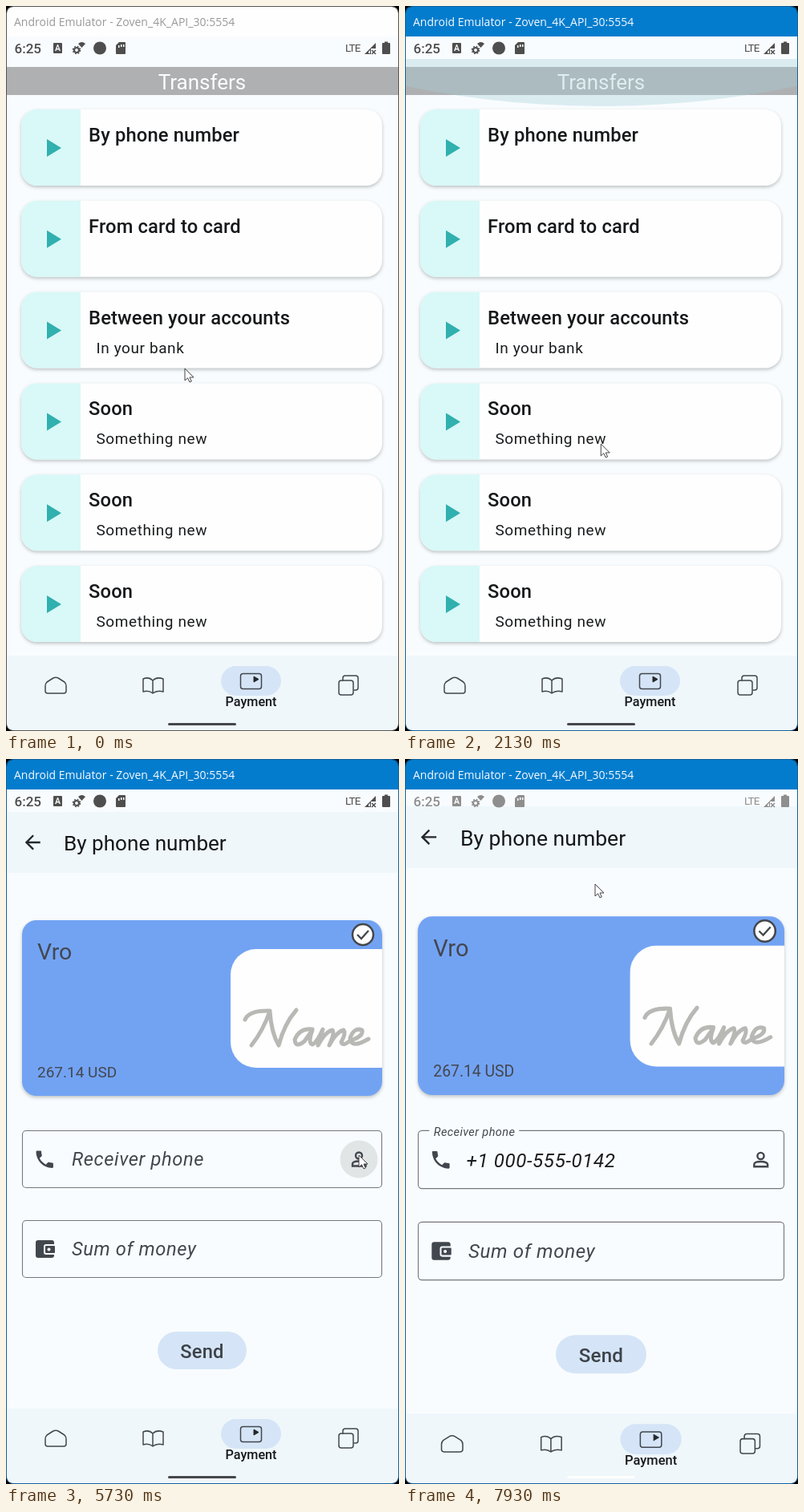
Recreate the animation shown at these times as an HTML page. Size 490x904 px, loop 8000 ms.

```html
<!DOCTYPE html>
<html lang="en">
<head>
<meta charset="utf-8">
<title>Payments app</title>
<style>
  html, body { margin: 0; width: 100%; height: 100%; overflow: hidden; background: #000; }
  svg { display: block; width: 100vw; height: 100vh; }
  text { font-family: Roboto, "Noto Sans", sans-serif; white-space: pre; }
  .bar { font: 14px "Open Sans", "Noto Sans", sans-serif; }
  .head { font-size: 23.74px; font-weight: 500; letter-spacing: .15px; fill: #16181a; }
  .sub { font-size: 19px; letter-spacing: .59px; fill: #1a1c1e; }
  .section { font-size: 26px; fill: #fefefe; text-anchor: middle; }
  .input { font-size: 23.74px; font-style: italic; letter-spacing: .59px; fill: #42474e; }
  .line { fill: none; stroke: #42474e; stroke-width: 1.5; stroke-linejoin: round; stroke-linecap: round; }
  .raised { filter: drop-shadow(0 2px 2px rgba(90, 100, 100, .38)); }
</style>
</head>
<body>
<svg id="stage" viewBox="0 0 490 904" preserveAspectRatio="none"></svg>
<script>
const LOOP = 8000;
const OPEN = 5950, CLOSE = 7790;
const PAGE = '#f9fcfe', TINT = '#eff7fb', PILL = '#d5e5f7', INK = '#42474e';
const PHONE = '+1 000-555-0142';

const text = (x, y, cls, str, extra = '') => `<text x="${x}" y="${y}" class="${cls}" ${extra}>${str}</text>`;
const rect = (x, y, w, h, fill, r = 0, extra = '') =>
  `<rect x="${x}" y="${y}" width="${w}" height="${h}" rx="${r}" fill="${fill}" ${extra}/>`;
const icon = (x, y, d) => `<path transform="translate(${x} ${y}) scale(1.187)" d="${d}"/>`;
const BACK = 'M20 11H7.83l5.59-5.59L12 4l-8 8 8 8 1.41-1.41L7.83 13H20z';

function card(y, title, sub = '') {
  return `<g transform="translate(0 ${y})">
    <g class="raised">${rect(19, 0, 450, 95, '#fefefe', 20)}</g>
    <path d="M93 0H39A20 20 0 0 0 19 20V75A20 20 0 0 0 39 95H93Z" fill="#d9f8f8"/>
    <path d="M51 37L69 48L51 59Z" fill="#30b0ae"/>
    ${text(103, 40, 'head', title)}${text(112.5, 76, 'sub', sub)}</g>`;
}

const section = (y, title) =>
  `<g transform="translate(0 ${y})">${rect(0, 0, 490, 35, 'rgba(0,0,0,.3)')}${text(244.5, 28, 'section', title)}</g>`;

function listPage() {
  const soon = ['Soon', 'Something new'];
  const items = [['By phone number'], ['From card to card'],
    ['Between your accounts', 'In your bank'], soon, soon, soon];
  return `<g id="list" clip-path="url(#listArea)">
    <g id="items">
      ${items.map((item, i) => card(129 + i * 113.8, ...item)).join('')}
      ${section(811.5, 'Payment')}
      ${card(865.5, 'Housing &amp; Public Utilities')}${card(979.3, ...soon)}
    </g>
    <g id="sticky">${section(0, 'Transfers')}</g>
    <ellipse id="glow" cx="244.5" rx="732" fill="#a4cdd8" opacity=".35"/>
  </g>`;
}

function bankCard() {
  return `<g id="bankCard">
    <g class="raised">${rect(20, 201, 449, 219, '#72a3f3', 18)}</g>
    <path d="M469 237H312A32 32 0 0 0 280 269V353A32 32 0 0 0 312 385H469Z" fill="#fefefe"/>
    <g fill="none" stroke="#b8b8b5" stroke-width="5" stroke-linecap="round" stroke-linejoin="round">
      <path d="M298 325Q303 313 329 314Q321 338 306 357M329 315Q331 342 340 357Q347 330 362 313"/>
      <path d="M382 337Q366 335 360 350Q361 361 372 352L382 338Q376 354 382 356Q388 353 395 337L389 357Q398 340 407 338Q410 341 403 357Q412 340 421 338Q424 342 418 353Q420 359 429 351Q446 346 444 338Q434 334 429 348Q430 362 452 349"/>
    </g>
    <circle cx="445" cy="219" r="13" fill="#fefefe" stroke="#44474b" stroke-width="2.5"/>
    <path d="M438 219L443 224L452 214" fill="none" stroke="#44474b" stroke-width="2.3"/>
    ${text(39, 250, '', 'Vro', 'font-size="28.5" fill="#44474e"')}
    ${text(39, 397, '', '267.14 USD', 'font-size="19" fill="#44474e"')}
  </g>`;
}

function formPage() {
  const field = y => rect(20.5, y, 448, 71, 'none', 4.5, 'stroke="#73777f" stroke-width="1.1"');
  return `<g id="form">
    ${rect(0, 66, 490, 76, TINT)}
    <g fill="#25282b">${icon(19, 89.7, BACK)}</g>
    ${text(72, 114, '', 'By phone number', 'font-size="26.1" fill="#16181a"')}
    ${bankCard()}
    ${field(463.5)}${field(575.5)}
    <circle id="ripple" cx="440" cy="499" fill="#e2e5e6"/>
    <g fill="${INK}">
      ${icon(34, 485, 'M6.62 10.79c1.44 2.83 3.76 5.14 6.59 6.59l2.2-2.2c.27-.27.67-.36 1.02-.24 1.12.37 2.33.57 3.57.57.55 0 1 .45 1 1V20c0 .55-.45 1-1 1-9.39 0-17-7.61-17-17 0-.55.45-1 1-1h3.5c.55 0 1 .45 1 1 0 1.25.2 2.45.57 3.57.11.35.03.74-.25 1.02z')}
      <path d="M40 600H57Q60 600 60 603V605H50Q47 605 47 608V615Q47 618 50 618H60V619Q60 622 57 622H40Q37 622 37 619V603Q37 600 40 600Z"/>
      ${rect(49, 607, 12, 9, INK, 1)}<circle cx="53.5" cy="611.5" r="2" fill="${PAGE}"/>
    </g>
    <g fill="none" stroke="${INK}" stroke-width="2.4">
      <circle cx="440" cy="494.5" r="4"/>
      <path d="M432 507.5V505Q432 501.5 440 501.5T448.5 505V507.5Z"/>
    </g>
    <g id="hint">${text(82, 507, 'input', 'Receiver phone')}</g>
    <g id="filled">
      ${rect(34, 460, 110, 7, PAGE)}
      ${text(39.5, 470, 'input', 'Receiver phone', 'style="font-size:14.25px;letter-spacing:.4px"')}
      ${text(79.5, 508, 'input', PHONE, 'style="fill:#1a1c1e"')}
    </g>
    ${text(82, 619, 'input', 'Sum of money')}
    ${rect(189, 714, 111, 47, PILL, 23.5)}
    ${text(244.5, 747, 'head', 'Send', 'text-anchor="middle" style="fill:#3d4248"')}
  </g>`;
}

function navBar() {
  return `${rect(0, 810, 490, 94, TINT)}${rect(268, 823, 75, 37, PILL, 18.5)}
    <g class="line">
      <path d="M49 848Q49 845 51 843L58 838.5Q62 836 66 838.5L73 843Q75 845 75 848V854Q75 857 72 857H52Q49 857 49 854Z"/>
      <path d="M183 841Q178 836 171 839V855Q178 853 183 857Q188 853 196 855V839Q188 836 183 841V857"/>
      <rect x="292.5" y="832.5" width="26" height="19" rx="3"/>
      <path d="M420 841V838Q420 835 423 835H436Q439 835 439 838V850Q439 853 436 853H434"/>
      <rect x="415" y="841" width="18" height="18" rx="3"/>
    </g>
    <path d="M309 836L315 839.5L309 843Z" fill="#25282b" stroke="#25282b"/>
    ${text(305.5, 873, '', 'Payment', 'font-size="16.2" font-weight="500" text-anchor="middle" fill="#16181a"')}`;
}

function picker() {
  return `<g id="picker">
    ${rect(0, 38, 490, 866, '#fafafa')}${rect(0, 38, 490, 28, '#1d3ba6')}${rect(0, 66, 490, 67, '#2a56c6')}
    <g fill="#fff">${icon(20.5, 85.5, BACK)}</g>
    ${text(86, 109, 'head', 'Choose a contact', 'style="fill:#fff;letter-spacing:0"')}
    <path d="M457 102L465 110" stroke="#fff" stroke-width="2.8"/>
    <circle cx="452" cy="97" r="6.5" fill="none" stroke="#fff" stroke-width="2.4"/>
    <g id="pressed">${rect(67, 141, 383, 66, '#dddddf')}</g>
    ${text(34, 179, '', 'J', 'font-size="18" font-weight="700" text-anchor="middle" fill="#2a56c6"')}
    <circle cx="110" cy="173.5" r="24" fill="#d81b60"/>
    ${text(110, 185, '', 'J', 'font-size="32" text-anchor="middle" fill="#f08aaa"')}
    ${text(152, 168, '', 'Jesk', 'font-size="19" fill="#27272a"')}
    ${text(152, 191, '', 'MOBILE ' + PHONE, 'font-size="16.6" letter-spacing=".1" fill="#77777a"')}
    ${rect(0, 885, 490, 19, '#000')}
  </g>`;
}

function statusBar() {
  return `<g id="status">
    ${text(10.5, 59, '', '6:25', 'font-size="17" font-weight="500"')}
    <path fill-rule="evenodd" d="M60 46H69Q70 46 70 47V58Q70 59 69 59H60Q59 59 59 58V47Q59 46 60 46ZM64 48L61 56H62.5L63 54.5H66L66.5 56H68L65 48ZM63.6 53L64.5 50L65.5 53Z"/>
    <circle cx="88" cy="55" r="3" fill="none" stroke="currentColor" stroke-width="2.2"/>
    <circle cx="88" cy="55" r="4.7" fill="none" stroke="currentColor" stroke-width="1.3" stroke-dasharray="1.9 1.8"/>
    <path d="M90 47Q94.5 43 99 47L94.5 52Z"/>
    <circle cx="117" cy="52.5" r="8"/>
    <path fill-rule="evenodd" d="M141 45H148Q149 45 149 46V59Q149 60 148 60H138Q137 60 137 59V49ZM140 49V52H141.5V49ZM143 48V51H144.5V48ZM146 48V51H147.5V48Z"/>
    ${text(423, 57, '', 'LTE', 'font-size="13.5" letter-spacing="-.9"')}
    <path fill-rule="evenodd" d="M447 60L461 46V53H455V60ZM452 57V59H454V55Z"/>
    <path d="M456 55L461 60M461 55L456 60" stroke="currentColor" stroke-width="1.5"/>
    <path d="M472 44.5H476V46H478Q479 46 479 47V59Q479 60 478 60H470Q469 60 469 59V47Q469 46 470 46H472Z"/>
  </g>`;
}

document.getElementById('stage').innerHTML = `
  <defs>
    <clipPath id="window"><rect x="1" y="1" width="488" height="902" rx="8"/></clipPath>
    <clipPath id="screen"><rect y="38" width="490" height="866"/></clipPath>
    <clipPath id="listArea"><rect y="66" width="490" height="744"/></clipPath>
  </defs>
  <rect width="490" height="904"/>
  <g clip-path="url(#window)">
    <g clip-path="url(#screen)">
      ${rect(0, 38, 490, 866, PAGE)}
      <g id="app">${listPage()}${formPage()}${navBar()}</g>
      ${picker()}
      ${statusBar()}
      <rect id="homeBar" x="202" y="894" width="85" height="3" rx="1.5"/>
    </g>
    <rect id="titleBar" width="490" height="38"/>
    ${text(10, 25, 'bar', 'Android Emulator - Zoven_4K_API_30:5554', 'id="title"')}
  </g>
  <rect id="frame" x=".5" y=".5" width="489" height="903" rx="8" fill="none"/>
  <path id="cursor" d="M0 0V15L3.5 11.8L6 17L8.3 16L6 11H11Z" fill="#fefefe" stroke="#303033" stroke-width=".9"/>`;

const el = Object.fromEntries([...document.querySelectorAll('#stage [id]')].map(node => [node.id, node]));
const clamp = (v, lo = 0, hi = 1) => Math.min(hi, Math.max(lo, v));
const ramp = (t, start, length) => clamp((t - start) / length);
const mix = (a, b, p) => a + (b - a) * p;
const settle = p => 1 - (1 - p) ** 4;
const show = (node, on) => node.setAttribute('display', on ? 'inline' : 'none');
const set = (node, attrs) => Object.entries(attrs).forEach(([k, v]) => node.setAttribute(k, v));
const zoom = k => `translate(244.5 470) scale(${k}) translate(-244.5 -470)`;

// Pointer stops: time, x, y
const STOPS = [[0, 223, 452], [730, 223, 452], [1470, 237, 160], [1600, 237, 160], [2250, 245, 584],
  [2450, 245, 584], [3070, 240, 177], [4270, 240, 177], [5070, 410, 540], [5330, 410, 540],
  [5600, 440, 494], [6200, 440, 494], [7000, 237, 156], [LOOP, 237, 156]];

function pointerAt(t) {
  const i = STOPS.findIndex(stop => stop[0] > t);
  const [t0, x0, y0] = STOPS[i - 1], [t1, x1, y1] = STOPS[i];
  const p = ramp(t, t0, t1 - t0), e = p * p * (3 - 2 * p);
  return [mix(x0, x1, e), mix(y0, y1, e)];
}

function render(t) {
  const [x, y] = pointerAt(t);
  set(el.cursor, { transform: `translate(${x} ${y})` });

  const active = t >= 730;
  set(el.titleBar, { fill: active ? '#047ccd' : '#fefefe' });
  set(el.title, { fill: active ? '#f6fbff' : '#99999a' });
  set(el.frame, { stroke: active ? '#15629c' : '#555558' });

  // The list follows the pointer past the touch slop; pulling beyond the top glows.
  const dragging = t < 2400;
  const scroll = dragging ? Math.max(0, 427.5 - y) : 0;
  const pull = t < 1600 ? 0 : dragging ? y - 427.5 : 156;
  const glow = 0.6 * Math.sqrt(clamp(pull / 118, 0, 1.2)) * (1 - ramp(t, 2400, 600));
  set(el.items, { transform: `translate(0 ${-scroll})` });
  set(el.sticky, { transform: `translate(0 ${Math.max(66, 76 - scroll)})` });
  set(el.glow, { cy: 66 - 634 * glow, ry: 732 * glow });

  const closing = t >= CLOSE;
  show(el.list, t < 3530);
  show(el.form, t >= 3530);
  show(el.bankCard, t >= 3600);
  show(el.hint, !closing);
  show(el.filled, closing);
  set(el.ripple, { r: 23.5 * ramp(t, 5570, 100), opacity: 1 - ramp(t, 5800, 200) });

  const opened = settle(ramp(t, OPEN, 400)), closed = settle(ramp(t, CLOSE, 400));
  set(el.app, { transform: zoom(closing ? mix(1.1, 1, closed) : mix(1, 1.15, opened)) });
  set(el.picker, {
    transform: zoom(closing ? mix(1, 0.9, closed) : mix(0.85, 1, opened)),
    opacity: closing ? 1 - ramp(t, CLOSE + 35, 50) : ramp(t, OPEN + 50, 50)
  });
  show(el.pressed, t >= 7250);

  const dark = closing ? ramp(t, 7830, 157) : 1 - ramp(t, OPEN + 50, 100);
  const tone = Math.round(mix(255, 78, dark));
  const shade = `rgb(${tone},${tone},${tone})`;
  set(el.status, { fill: shade, color: shade });
  set(el.homeBar, { fill: t < OPEN + 100 ? '#45474a' : '#fefefe' });
}

let start;
function tick(now) {
  start ??= now;
  render((now - start) % LOOP);
  requestAnimationFrame(tick);
}
render(0);
requestAnimationFrame(tick);
</script>
</body>
</html>
```
